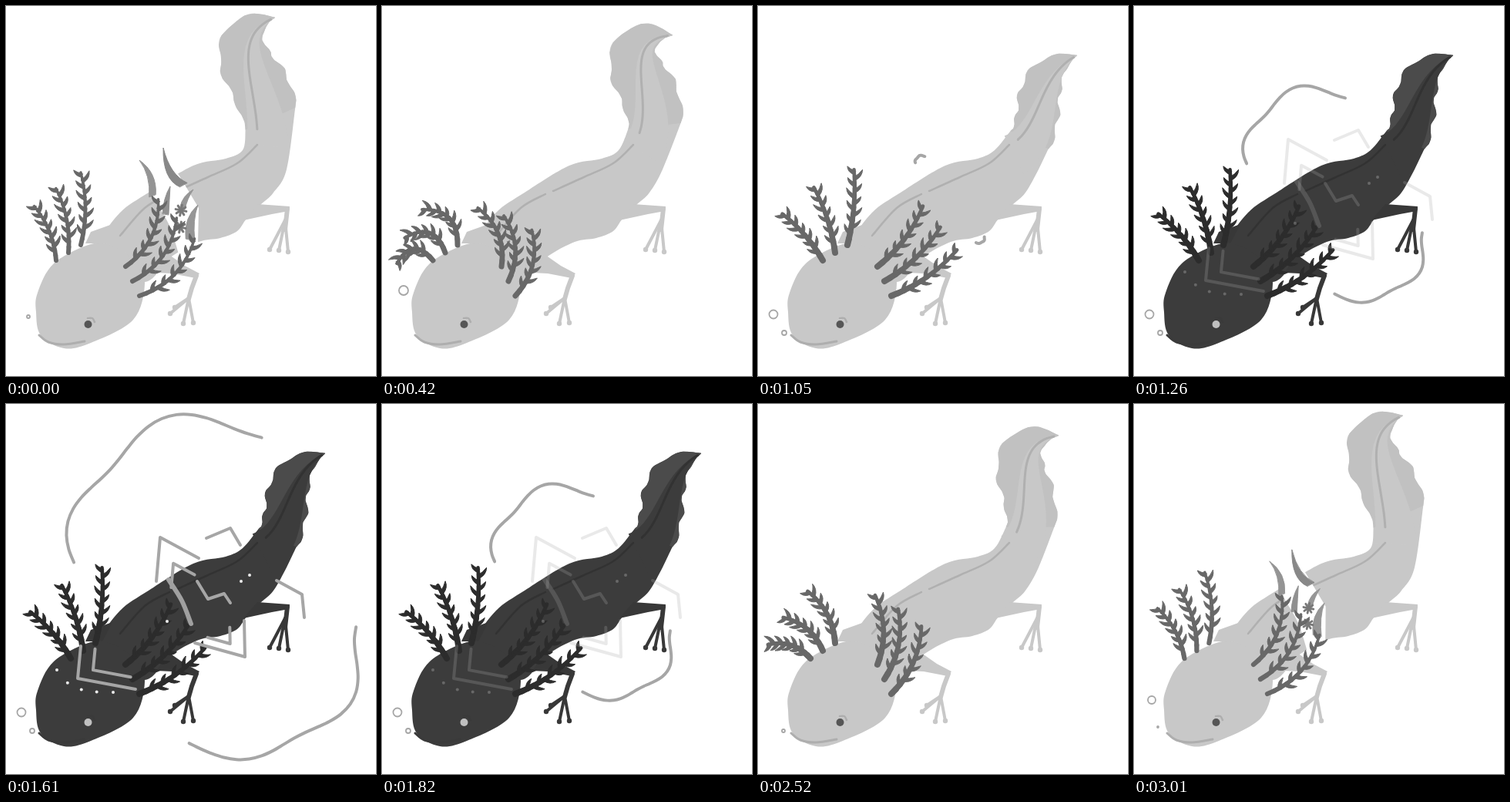
An HTML page with a canvas that plays this animation: 480 px wide and 480 px high, repeating every 3080 ms.

```html
<!DOCTYPE html>
<html lang="en">
<head>
<meta charset="utf-8">
<title>Axolotl</title>
<style>
html, body { margin: 0; width: 100%; height: 100%; overflow: hidden; background: #fff; }
canvas { display: block; width: 480px; height: 480px; }
</style>
</head>
<body>
<canvas id="stage" width="480" height="480"></canvas>
<script>
const ctx = document.getElementById('stage').getContext('2d');
const LOOP = 3080, STEP = 70;
const { PI, sin, cos, hypot } = Math;
const RAD = PI / 180;

const clamp = v => Math.max(0, Math.min(1, v));
const mix = (a, b, k) => a + (b - a) * k;
const mixAll = (a, b, k) => a.map((v, i) => mix(v, b[i], k));

// Value of a keyed track [[time, numbers], ...] at time t
function track(keys, t) {
  const next = keys.findIndex(key => t <= key[0]);
  if (next < 0) return keys[keys.length - 1][1];
  if (next === 0) return keys[0][1];
  const [t0, a] = keys[next - 1], [t1, b] = keys[next];
  return mixAll(a, b, (t - t0) / (t1 - t0));
}

const gray = v => `rgb(${v},${v},${v})`;

function fill(path, v) {
  ctx.fillStyle = gray(v);
  ctx.fill(path);
}

function stroke(path, v, width) {
  ctx.strokeStyle = gray(v);
  ctx.lineWidth = width;
  ctx.stroke(path);
}

function poly(p) {
  const path = new Path2D();
  for (let i = 0; i < p.length; i += 2) path.lineTo(p[i], p[i + 1]);
  return path;
}

function circle(x, y, r) {
  const path = new Path2D();
  path.arc(x, y, r, 0, 2 * PI);
  return path;
}

const dot = (x, y, r, v) => fill(circle(x, y, r), v);

// Smooth curve through flat x,y pairs
function curve(p, closed) {
  const n = p.length / 2;
  const at = i => {
    const j = closed ? (i + n) % n : Math.max(0, Math.min(n - 1, i));
    return [p[2 * j], p[2 * j + 1]];
  };
  const path = new Path2D();
  path.moveTo(p[0], p[1]);
  for (let i = 0; i < (closed ? n : n - 1); i++) {
    const [a, b, c, d] = [at(i - 1), at(i), at(i + 1), at(i + 2)];
    path.bezierCurveTo(b[0] + (c[0] - a[0]) / 6, b[1] + (c[1] - a[1]) / 6,
      c[0] - (d[0] - b[0]) / 6, c[1] - (d[1] - b[1]) / 6, c[0], c[1]);
  }
  if (closed) path.closePath();
  return path;
}

// Curved spike, wide at its root and pointed at its end
function spike(x0, y0, cx, cy, x1, y1, width, v) {
  const d = hypot(x1 - x0, y1 - y0);
  const nx = (y0 - y1) / d * width / 2, ny = (x1 - x0) / d * width / 2;
  const path = new Path2D();
  path.moveTo(x0 + nx, y0 + ny);
  path.quadraticCurveTo(cx + nx, cy + ny, x1, y1);
  path.quadraticCurveTo(cx - nx, cy - ny, x0 - nx, y0 - ny);
  path.closePath();
  fill(path, v);
  ctx.lineWidth = 1;
  ctx.strokeStyle = gray(v);
  ctx.stroke(path);
}

// Tail: two bends and the tip of its spine, then left and right fin size
const raised = [330, 110, 285, 40, 349, 15, 33, 20];
const hooked = [362, 130, 300, 42, 377, 38, 36, 18];
const eased = [366, 135, 318, 50, 390, 41, 33, 12];
const lowered = [368, 160, 362, 90, 414, 64, 26, 5];
const tailKeys = [[0, raised], [420, hooked], [560, eased], [820, lowered],
  [2060, lowered], [2520, eased], [2660, hooked], [2980, raised]];

function tailShape(t) {
  const [x1, y1, x2, y2, x3, y3, finL, finR] = track(tailKeys, t);
  const bezier = (a, b, c, d, u) => {
    const w = 1 - u;
    return w * w * w * a + 3 * w * w * u * b + 3 * w * u * u * c + u * u * u * d;
  };
  const slope = (a, b, c, d, u) => {
    const w = 1 - u;
    return w * w * (b - a) + 2 * w * u * (c - b) + u * u * (d - c);
  };
  // Point beside the spine; off < 0 lies on the left
  const beside = (u, off) => {
    const dx = slope(326, x1, x2, x3, u), dy = slope(181, y1, y2, y3, u), d = hypot(dx, dy);
    return [bezier(326, x1, x2, x3, u) - dy / d * off, bezier(181, y1, y2, y3, u) + dx / d * off];
  };
  const ripple = u => 3 * sin(30 * u) * sin(PI * u);
  const edges = {
    coreL: u => -14 * (1 - u),
    coreR: u => 42 * (1 - u),
    finL: u => -14 * (1 - u) - finL * sin(PI * u ** 1.6) - ripple(u),
    finR: u => 42 * (1 - u) + 2 * finR * sin(PI * u) * (1 - u) + ripple(u),
    spine: () => 0
  };
  return (edge, from, to) => {
    const points = [];
    for (let i = 0; i <= 18; i++) {
      const u = mix(from, to, i / 18);
      points.push(...beside(u, edges[edge](u)));
    }
    return points;
  };
}

const trunk = [364,212, 347,242, 330,258, 312,276, 300,292, 278,301, 250,306, 212,327,
  180,358, 120,340, 122,306, 148,268, 185,242, 243,207, 285,198, 307,187];
const head = [45,427, 39,397, 41,372, 62,334, 110,309, 140,312, 168,332, 180,360, 165,407, 110,437, 75,444];

function drawBody(t, dark) {
  const skin = mix(200, 60, dark), line = mix(176, 50, dark);
  const edge = tailShape(t);
  fill(curve([...edge('finL', 0.1, 0.98), ...edge('finR', 1, 0.2), ...trunk], true), skin);
  const fin = poly([...edge('finL', 0.1, 1), ...edge('finR', 1, 0.2)]);
  fill(fin, mix(193, 75, dark));
  fill(poly([...edge('coreL', 0, 1), ...edge('coreR', 1, 0)]), skin);
  stroke(curve(edge('spine', 0.1, 0.97)), line, 3);
  stroke(curve([326,180, 300,204, 262,222, 222,240]), line, 2.5);
  stroke(curve([212,244, 180,262, 148,298]), line, 2.5);
}

// Gills: left root, then per side lean, fan, length and bend of three stalks, then width
const upright = [65, -112, 11, 76, 12, -64, 9, 97, 27, 6];
const curled = [66, -185, 25, 47, 34, -112, 18, 82, 24, 7];
const spread = [84, -131, 23, 80, 8, -53, 9, 98, 13, 8];
const flared = [68, -162, 22, 58, 17, -92, 13, 90, 19, 8];
const gillKeys = [[0, upright], [420, curled], [910, spread], [2030, spread], [2520, flared], [3080, upright]];

function drawStalk(x, y, angle, len, bend, width, v) {
  const dx = cos(angle), dy = sin(angle);
  const at = u => {
    const along = len * u, off = 2 * bend * u * (1 - u);
    return [x + dx * along - dy * off, y + dy * along + dx * off,
      angle + Math.atan2(2 * bend * (1 - 2 * u), len)];
  };
  for (let i = 0; i < 12; i++) {
    const [x0, y0] = at(i / 12), [x1, y1] = at((i + 1) / 12);
    stroke(poly([x0, y0, x1, y1]), v, width * (1 - i / 26));
  }
  for (let i = 0; i < 11; i++) {
    const [px, py, dir] = at(0.16 + i * 0.08);
    const side = i % 2 ? 1 : -1, size = 14 + 2 * sin(i * 2.3);
    const out = dir + side * 1.1, end = dir + side * 0.75;
    spike(px, py, px + cos(out) * size * 0.6, py + sin(out) * size * 0.6,
      px + cos(end) * size, py + sin(end) * size, 5, v);
  }
}

function drawGills(t, v) {
  const [rootX, leanL, fanL, lenL, bendL, leanR, fanR, lenR, bendR, width] = track(gillKeys, t);
  for (let i = 0; i < 3; i++) {
    drawStalk(rootX + 16 * i, 330 - 10 * i, (leanL + fanL * i) * RAD, lenL + 9 * i, bendL, width, v);
    drawStalk(155 + 9 * i, 338 + 19 * i, (leanR + fanR * i) * RAD, lenR + 3 * i, bendR, width, v);
  }
}

// The cut through the trunk: front and rear edge part from one seam
const cutFront = [200,222, 190,243, 212,285, 228,335];
const cutRear = [218,210, 226,222, 250,262, 249,309];

function drawCut(open) {
  if (open <= 0) return;
  const seam = mixAll(cutFront, cutRear, 0.45);
  const front = curve(mixAll(seam, cutFront, open));
  const rear = mixAll(seam, cutRear, open);
  for (let i = 6; i >= 0; i -= 2) front.lineTo(rear[i], rear[i + 1]);
  fill(front, 255);

  ctx.save();
  ctx.translate(217, 262);
  ctx.scale(open, open);
  ctx.translate(-217, -262);
  spike(190,246, 192,218, 173,200, 9, 148);
  spike(230,232, 208,222, 204,184, 11, 136);
  spike(207,270, 208,250, 213,234, 8, 144);
  spike(229,262, 232,248, 243,238, 7, 150);
  spike(239,303, 236,276, 249,258, 12, 150);
  for (const [x, y] of [[227, 265], [226, 287]]) {
    for (let a = 0.2; a < PI; a += PI / 4) {
      const c = 7 * cos(a), s = 7 * sin(a);
      stroke(poly([x - c, y - s, x + c, y + s]), 120, 3);
    }
  }
  ctx.restore();
}

function drawToes(x, y, ends, v) {
  for (const [ex, ey] of ends) {
    stroke(poly([x, y, ex, ey]), v, 4);
    dot(ex, ey, 3.2, v);
  }
}

function drawLegs(v) {
  fill(poly([138,283, 110,293, 103,308, 125,308]), v);
  fill(poly([212,323, 232,337, 251,347, 246,353, 215,347, 195,346]), v);
  stroke(poly([247,350, 241,366, 237,380]), v, 6);
  drawToes(237, 379, [[213, 399], [219, 391], [230, 412], [243, 411]], v);
  fill(poly([326,257, 368,260, 367,266, 345,270, 308,278]), v);
  stroke(poly([365,263, 362,290]), v, 6);
  drawToes(362, 278, [[342, 316], [354, 317], [366, 319]], v);
}

function drawFace(dark) {
  const line = mix(174, 58, dark);
  fill(curve(head, true), mix(200, 60, dark));
  stroke(curve([43,427, 55,436, 75,439, 102,435]), line, 3);
  stroke(curve([106,405, 112,405, 115,410]), line, 2.5);
  dot(106.5, 413, 5, mix(86, 192, dark));
}

// Rippled arc growing from a small mark at (x0, y0) to a wide ring round (x1, y1)
function drawWave(x0, y0, x1, y1, from, to, radius, k) {
  const cx = mix(x0, x1, k), cy = mix(y0, y1, k), scale = mix(0.05, 1, k);
  const points = [];
  for (let s = 0; s <= 1.001; s += 0.05) {
    const a = mix(from, to, s) * RAD, r = radius(s) * scale;
    points.push(cx + r * cos(a), cy + r * sin(a));
  }
  stroke(curve(points), 166, 4);
}

const topRadius = s => 157 + 30 * s + 10 * sin(11.6 * s);
const lowRadius = s => 155 + 10 * s + (2 + 11 * s) * sin(4 * PI * (s - 0.075));

// Corner lines: each with a smaller copy drawn in towards (cx, cy)
const corners = [
  { p: [97,314, 93,356, 168,370], cx: 150, cy: 325, k: 0.65 },
  { p: [195,230, 200,173, 250,200], cx: 238, cy: 248, k: 0.55 },
  { p: [245,310, 310,328, 309,281], cx: 275, cy: 297, k: 0.45 }
];
const bolts = [[248,230, 262,253, 283,246, 291,258], [260,174, 291,161, 304,183], [351,229, 384,247, 387,277]];

function drawMarks(k) {
  if (k <= 0) return;
  ctx.globalAlpha = k;
  for (const c of corners) {
    stroke(poly(c.p), 166, 4);
    stroke(poly(c.p.map((v, i) => mix(i % 2 ? c.cy : c.cx, v, c.k))), 166, 4);
  }
  for (const b of bolts) stroke(poly(b), 166, 4);
  stroke(curve([211,228, 228,255, 240,285]), 160, 6);
  for (let s = 0; s <= 1; s += 0.25) dot(66 + 73 * s ** 1.2, 374 - 29 * (1 - s) ** 3, 2, 235);
  dot(305, 230, 2, 235);
  dot(316, 222, 2, 235);
  dot(209, 282, 2, 235);
  ctx.globalAlpha = 1;
}

// Bubbles: x, y, radius over time
const bubbles = [
  [[0, [29, 403, 2]], [420, [28, 369, 6]], [490, [26, 363, 6.5]]],
  [[560, [34, 426, 1]], [1050, [20, 400, 5.5]], [2030, [20, 400, 5.5]], [2310, [15, 372, 7]]],
  [[840, [36, 427, 1]], [1050, [34, 424, 3]], [2030, [34, 424, 3]], [2380, [24, 398, 6]]],
  [[2450, [35, 427, 1]], [2520, [33, 424, 2]], [3010, [23, 384, 5]]],
  [[2940, [33, 424, 1]], [3010, [31, 419, 1]]]
];

function drawBubbles(t) {
  for (const keys of bubbles) {
    if (t < keys[0][0] || t > keys[keys.length - 1][0]) continue;
    stroke(circle(...track(keys, t)), 166, 1.8);
  }
}

function draw(t) {
  const away = Math.abs(t - 1540);
  const reach = 1 - clamp((away - 70) / 420);
  const dark = clamp((490 - away) / 210);
  const open = clamp(Math.max(1 - t / 350, (t - 2560) / 480));
  ctx.fillStyle = '#fff';
  ctx.fillRect(0, 0, 480, 480);
  drawBody(t, dark);
  drawCut(open);
  drawLegs(mix(200, 56, dark));
  drawFace(dark);
  drawGills(t, mix(104, 44, dark));
  if (away <= 560) {
    drawWave(212, 203, 245, 200, 178, 299, topRadius, reach);
    drawWave(286, 300, 300, 300, 114, -4, lowRadius, reach);
  }
  drawMarks(clamp((reach - 0.4) / 0.4));
  drawBubbles(t);
}

ctx.lineCap = ctx.lineJoin = 'round';
const start = performance.now();
function tick() {
  const t = (performance.now() - start) % LOOP;
  draw(Math.floor(t / STEP) * STEP);
  requestAnimationFrame(tick);
}
tick();
</script>
</body>
</html>
```
